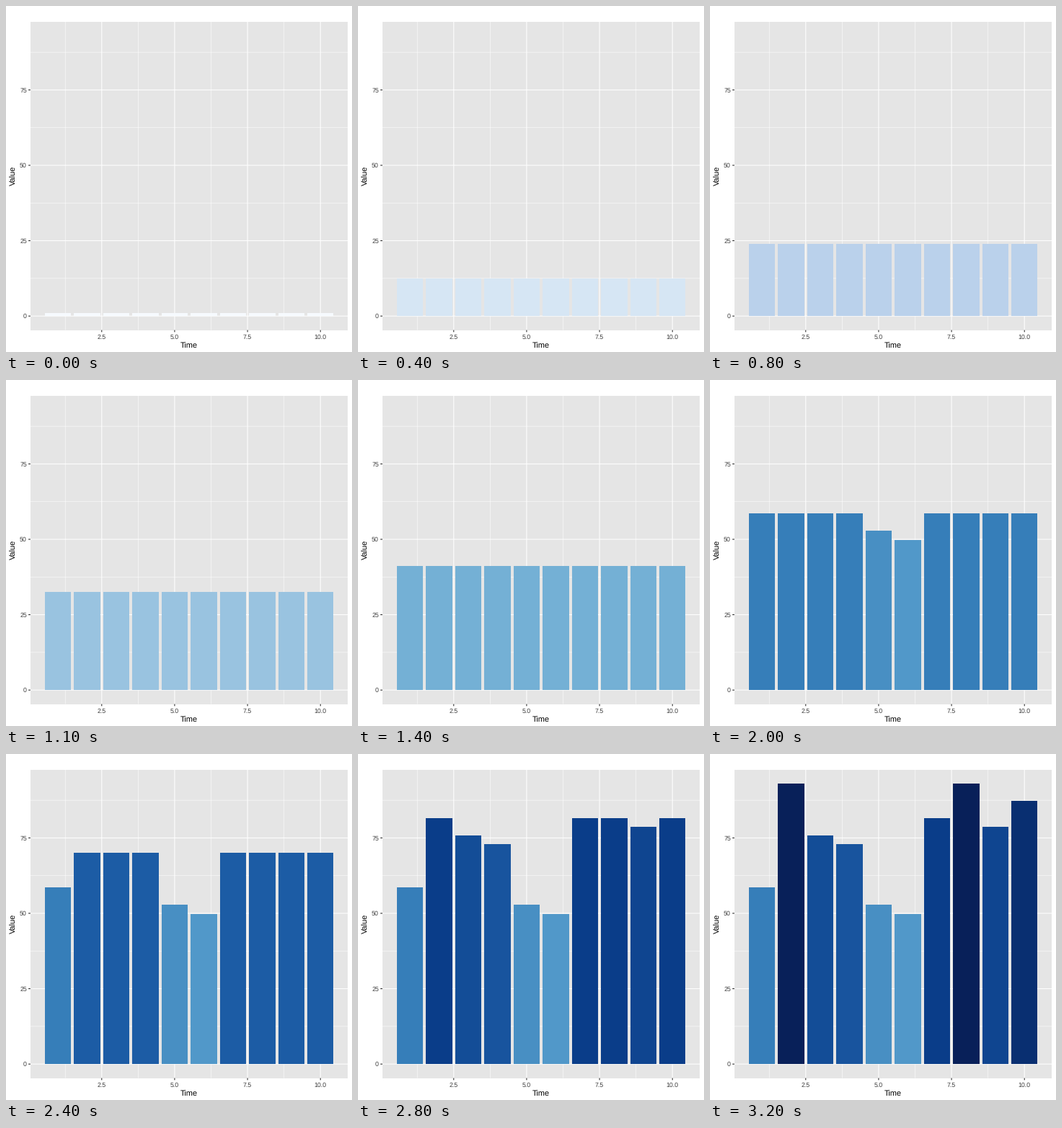
Animation, 480 px wide and 480 px high, one loop 3.3 s. Source, as a matplotlib script:

```python
import numpy as np
import matplotlib.pyplot as plt
from matplotlib.animation import FuncAnimation
from matplotlib.patches import Rectangle

SIZE, DPI = 480, 72
FRAMES, INTERVAL = 33, 100

plt.rcParams["font.family"] = "Liberation Sans"
plt.rcParams["text.hinting"] = "none"

# Panel geometry in pixels, y pointing down
LEFT, SX, X_MIN, X_MAX = 33.85, 40.46, 0.055, 10.945
BASE, SY, Y_MIN, Y_MAX = 430.15, 4.183, -4.65, 97.65

# Growth step at which each bar stops, and the value after a given step
STOPS = (20, 32, 26, 25, 18, 17, 28, 32, 27, 30)
START, STEP = 1, 92 / 32

BLUES = np.array([
    (246, 250, 254), (214, 230, 244), (186, 209, 235),
    (142, 191, 220), (90, 160, 206), (54, 126, 185),
    (28, 92, 165), (10, 61, 137), (8, 32, 89),
]) / 255
KNOTS = np.linspace(0, 32, len(BLUES))


def px(x):
    return LEFT + (x - X_MIN) * SX


def py(y):
    return BASE - y * SY


def shade(step):
    return [np.interp(step, KNOTS, channel) for channel in BLUES.T]


def rect(x0, x1, y0, y1, color, z):
    """Pixel-aligned box given in data units."""
    l, r, b, t = round(px(x0)), round(px(x1)), round(py(y0)), round(py(y1))
    patch = Rectangle((l, t), r - l, b - t, fc=color, lw=0, zorder=z)
    return ax.add_patch(patch)


def line(xs, ys, color, width, z):
    ax.plot(xs, ys, color=color, lw=width, zorder=z,
            solid_capstyle="butt", snap=False)


def grid(xs, ys, width, z):
    for y in ys:
        line((px(X_MIN), px(X_MAX)), (py(y), py(y)), "white", width, z)
    for x in xs:
        line((px(x), px(x)), (py(Y_MIN), py(Y_MAX)), "white", width, z)


fig = plt.figure(figsize=(SIZE / DPI, SIZE / DPI), dpi=DPI, facecolor="white")
ax = fig.add_axes((0, 0, 1, 1))
ax.set_xlim(0, SIZE)
ax.set_ylim(SIZE, 0)
ax.axis("off")

X_TICKS, Y_TICKS = (2.5, 5, 7.5, 10), (0, 25, 50, 75)
rect(X_MIN, X_MAX, Y_MIN, Y_MAX, "#e5e5e5", 0)
grid((1.25, 3.75, 6.25, 8.75), (12.5, 37.5, 62.5, 87.5), 0.53, 1)
grid(X_TICKS, Y_TICKS, 1.07, 2)

TICK, LABEL = "#262626", dict(size=8.8, color="#3c3c3c", va="baseline")
bottom = py(Y_MIN)
for x in X_TICKS:
    line((px(x), px(x)), (bottom, bottom + 2.75), TICK, 1.07, 4)
    ax.text(px(x), 462.3, f"{x:.1f}", ha="center", **LABEL)
for y in Y_TICKS:
    line((LEFT - 2.75, LEFT), (py(y), py(y)), TICK, 1.07, 4)
    ax.text(28.9, py(y) + 3.15, str(y), ha="right", **LABEL)

ax.text(254.1, 474.8, "Time", size=11, color="black",
        ha="center", va="baseline")
ax.text(13.6, 235.7, "Value", size=11, color="black", rotation=90,
        rotation_mode="anchor", ha="center", va="baseline")

bars = [rect(i + 0.55, i + 1.45, 0, START, shade(0), 3)
        for i in range(len(STOPS))]


def update(frame):
    for bar, stop in zip(bars, STOPS):
        step = min(frame, stop)
        top = round(py(START + STEP * step))
        bar.set_y(top)
        bar.set_height(round(BASE) - top)
        bar.set_facecolor(shade(step))
    return bars


anim = FuncAnimation(fig, update, frames=FRAMES, interval=INTERVAL,
                     repeat=True, repeat_delay=0)
plt.show()
```
